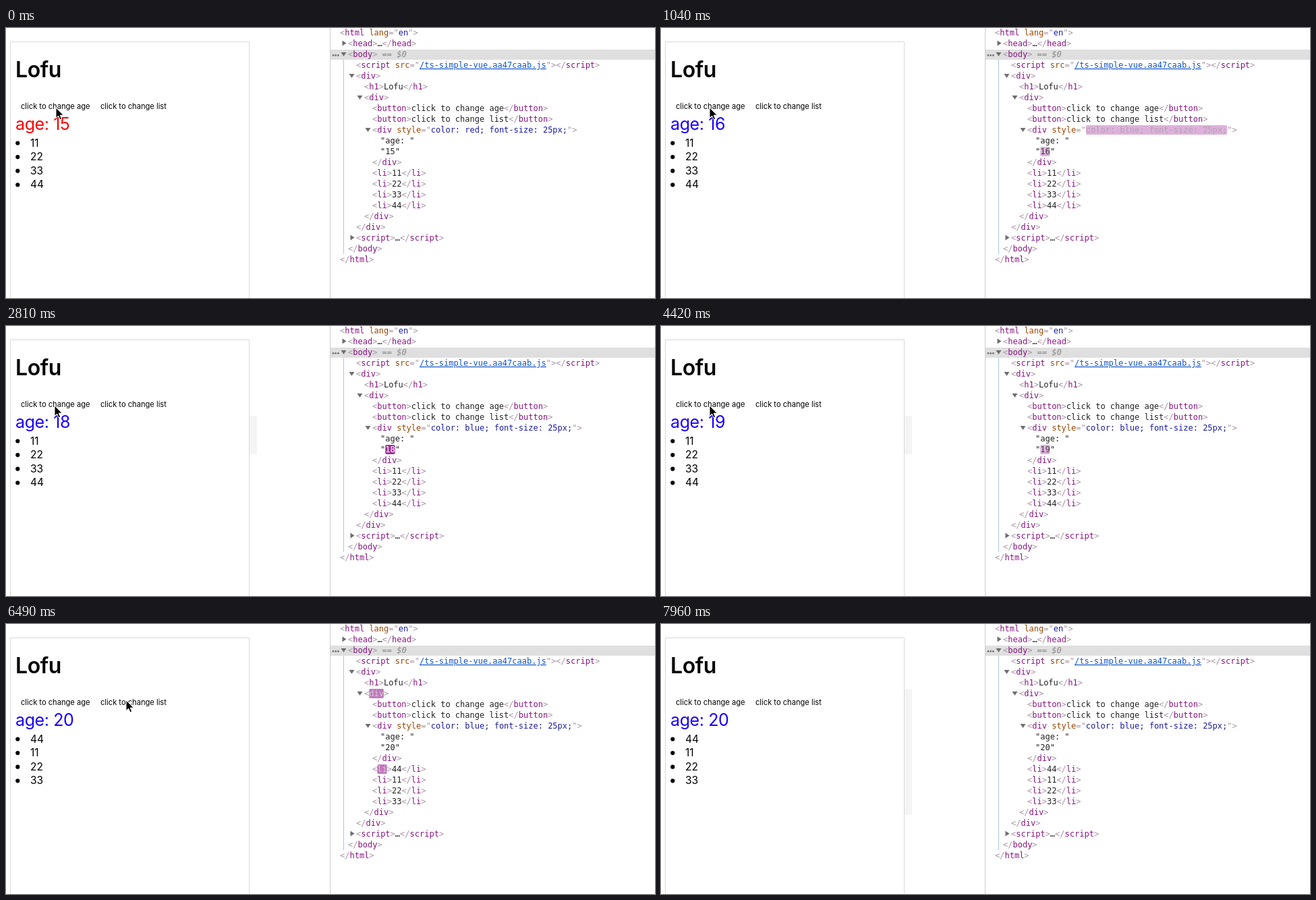
Write an HTML page that moves like this. It is 962 px wide and 400 px high and loops after 8710 ms.

```html
<!DOCTYPE html>
<html lang="en">
<head>
<meta charset="utf-8">
<title>Click to change</title>
<style>
html, body { margin: 0; width: 100%; height: 100%; overflow: hidden; background: #fff; }
svg { display: block; width: 962px; height: 400px; }
text { white-space: pre; }
.page { font-family: Inter, "Open Sans", sans-serif; fill: #000; }
.code { font: 12px "DejaVu Sans Mono", "Noto Sans Mono", monospace; fill: #222; }
</style>
</head>
<body>
<svg id="stage" viewBox="0 0 962 400"></svg>
<script>
const LOOP = 8710, STEP = 147, CHAR = 7.224;
const stage = document.getElementById('stage');
const COLORS = {
  punct: [168, 148, 166], tag: [136, 18, 128], attr: [153, 69, 0],
  value: [26, 26, 166], link: [17, 85, 204], text: [34, 34, 34], note: [136, 136, 136]
};
const PURPLE = [158, 54, 153], PINK = [231, 195, 230], WHITE = [255, 255, 255];
const rgb = c => `rgb(${c.map(Math.round)})`;
const mix = (a, b, k) => a.map((v, i) => v + (b[i] - v) * k);

function add(name, attrs, parent = stage, content = '') {
  const el = document.createElementNS('http://www.w3.org/2000/svg', name);
  for (const key in attrs) el.setAttribute(key, attrs[key]);
  el.textContent = content;
  return parent.appendChild(el);
}

// Web page on the left
const strip = add('rect', { x: 361, width: 11, fill: '#f4f4f4' });
add('rect', { x: 6.5, y: 20.5, width: 354, height: 400, fill: 'none', stroke: '#d9d9d9' });

function pageText(x, y, size, content, more = {}) {
  return add('text', { class: 'page', x, y, 'font-size': size, ...more }, stage, content);
}
pageText(14, 73, 32, 'Lofu', { 'font-weight': 600, 'letter-spacing': -.4 });
pageText(22, 119.5, 11.15, 'click to change age');
pageText(140, 119.5, 11.15, 'click to change list');
const ageText = pageText(14, 151, 25, '', { 'letter-spacing': -.4 });
const items = [0, 1, 2, 3].map(i => {
  const y = 175.5 + i * 20.6;
  add('circle', { cx: 17.3, cy: y - 5, r: 3.1 });
  return pageText(36, y, 15.5, '');
});

// Element inspector on the right
add('rect', { x: 480, y: 0, width: 1, height: 400, fill: '#ccc' });
add('rect', { x: 481, y: 32, width: 481, height: 15, fill: '#dfdfdf' });
add('rect', { x: 500, y: 47, width: 1, height: 288, fill: '#a9c9ee' });
[485, 488.7, 492.4].forEach(cx => add('circle', { cx, cy: 40.5, r: 1.4, fill: '#777' }));
const arrow = d => add('path', { d, fill: '#6e6e6e' });
[[500.5, 36], [512.5, 68], [524.5, 100], [536.5, 148]].forEach(([x, y]) => arrow(`M${x - 4} ${y}h8l-4 6z`));
[[498.5, 18.5], [510.5, 306.5]].forEach(([x, y]) => arrow(`M${x} ${y}v8l6 -4z`));

const open = (name, ...attrs) => [['punct', '<'], ['tag', name], ...attrs, ['punct', '>']];
const close = name => [['punct', '</'], ['tag', name], ['punct', '>']];
const attr = (name, value, kind = 'value') =>
  [['text', ' '], ['attr', name], ['punct', '="'], [kind, value], ['punct', '"']];
const pair = (name, content) => [...open(name), ['text', content], ...close(name)];

const rows = [];
function row(depth, parts) {
  const n = rows.length, x = 495 + depth * 12;
  const line = add('text', { class: 'code', x, y: 11 + n * 16 });
  let col = 0;
  const spans = parts.map(([kind, content]) => {
    const el = add('tspan', { fill: rgb(COLORS[kind]) }, line, content);
    if (kind === 'link') el.setAttribute('text-decoration', 'underline');
    if (content === '$0') el.setAttribute('font-style', 'italic');
    const span = { el, kind, line, x: x + col * CHAR, y: n * 16, width: content.length * CHAR };
    col += content.length;
    return span;
  });
  rows.push(spans);
  return spans;
}

row(0, open('html', ...attr('lang', 'en')));
row(1, pair('head', '…'));
row(1, [...open('body'), ['note', ' == '], ['note', '$0']]);
row(2, [...open('script', ...attr('src', '/ts-simple-vue.aa47caab.js', 'link')), ...close('script')]);
row(2, open('div'));
row(3, pair('h1', 'Lofu'));
const wrapper = row(3, open('div'));
row(4, pair('button', 'click to change age'));
row(4, pair('button', 'click to change list'));
const styled = row(4, open('div', ...attr('style', 'color: blue; font-size: 25px;')));
row(5, [['text', '"age: "']]);
const ageRow = row(5, [['text', '"'], ['text', '15'], ['text', '"']]);
row(4, close('div'));
const listRows = [0, 1, 2, 3].map(() => row(4, pair('li', '00')));
row(3, close('div'));
row(2, close('div'));
row(2, pair('script', '…'));
row(1, close('body'));
row(0, close('html'));

// Fading mark behind a changed piece of code
function marker(span, inherited) {
  const box = add('rect', { x: span.x, y: span.y, width: span.width, height: 14, rx: 2 });
  stage.insertBefore(box, span.line);
  return { box, el: span.el, own: COLORS[span.kind], inherited: COLORS[inherited] };
}
const styleMark = marker(styled[5], 'punct');
const ageMark = marker(ageRow[1], 'text');
const listMarks = [wrapper[1], listRows[0][1]].map(s => marker(s, 'punct'));

// cubic-bezier(0, 0, .2, 1)
function ease(x) {
  let lo = 0, hi = 1;
  for (let i = 0; i < 24; i++) {
    const s = (lo + hi) / 2;
    if (.6 * (1 - s) * s * s + s ** 3 < x) lo = s; else hi = s;
  }
  return 3 * (1 - lo) * lo * lo + lo ** 3;
}

function fade(mark, elapsed) {
  const p = Math.floor((elapsed + 2) / STEP) * STEP / 1000;
  const on = elapsed >= 0 && p < 1;
  mark.box.setAttribute('visibility', on ? 'visible' : 'hidden');
  let ink = mark.own;
  if (on) {
    const early = p < .8;
    const k = ease(early ? p / .8 : (p - .8) / .2);
    ink = early ? mix(WHITE, mark.inherited, k) : mix(mark.inherited, mark.own, k);
    mark.box.setAttribute('fill', rgb(early ? mix(PURPLE, PINK, k) : mix(PINK, WHITE, k)));
  }
  mark.el.setAttribute('fill', rgb(ink));
}

const cursor = add('path', {
  d: 'M0 0V15.5L3.6 12.2L6 17.8L8.6 16.7L6.2 11.2H11.2Z',
  fill: '#000', stroke: '#fff', 'stroke-width': 1, 'stroke-linejoin': 'round'
});

const clicks = [600, 1780, 2810, 3980, 4870];
const SHUFFLE = 6200;
// time, x, y of the pointer tip
const pointer = [
  [0, 74, 118], [150, 72, 118], [5010, 84, 112], [5160, 112, 104], [5310, 150, 104],
  [5460, 178, 113], [7380, 350, 158], [7520, 550, 206], [7660, 760, 260],
  [7810, 930, 240], [7960, 990, 230]
];
// time, top, bottom of the grey strip beside the page
const strips = [[0, 0, 0], [1490, 133, 190], [SHUFFLE, 0, 0], [7520, 97, 224], [7960, 97, 282]];
const latest = (list, t) => list.filter(e => e[0] <= t).pop();

function draw(t) {
  const count = clicks.filter(c => c <= t).length;
  const age = 15 + count;
  const color = count ? 'blue' : 'red';
  ageText.textContent = `age: ${age}`;
  ageText.style.fill = count ? '#1a00ff' : '#f00';
  ageRow[1].el.textContent = age;
  styled[5].el.textContent = `color: ${color}; font-size: 25px;`;

  const order = t < SHUFFLE ? [11, 22, 33, 44] : [44, 11, 22, 33];
  order.forEach((n, i) => {
    items[i].textContent = n;
    listRows[i][3].el.textContent = n;
  });

  fade(styleMark, t - clicks[0]);
  fade(ageMark, count ? t - clicks[count - 1] : -1);
  listMarks.forEach(m => fade(m, t - SHUFFLE));

  const [, x, y] = latest(pointer, t);
  cursor.setAttribute('transform', `translate(${x} ${y})`);
  const [, top, bottom] = latest(strips, t);
  strip.setAttribute('y', top);
  strip.setAttribute('height', bottom - top);
}

const start = performance.now();
function tick() {
  draw((performance.now() - start) % LOOP);
  requestAnimationFrame(tick);
}
draw(0);
requestAnimationFrame(tick);
</script>
</body>
</html>
```
